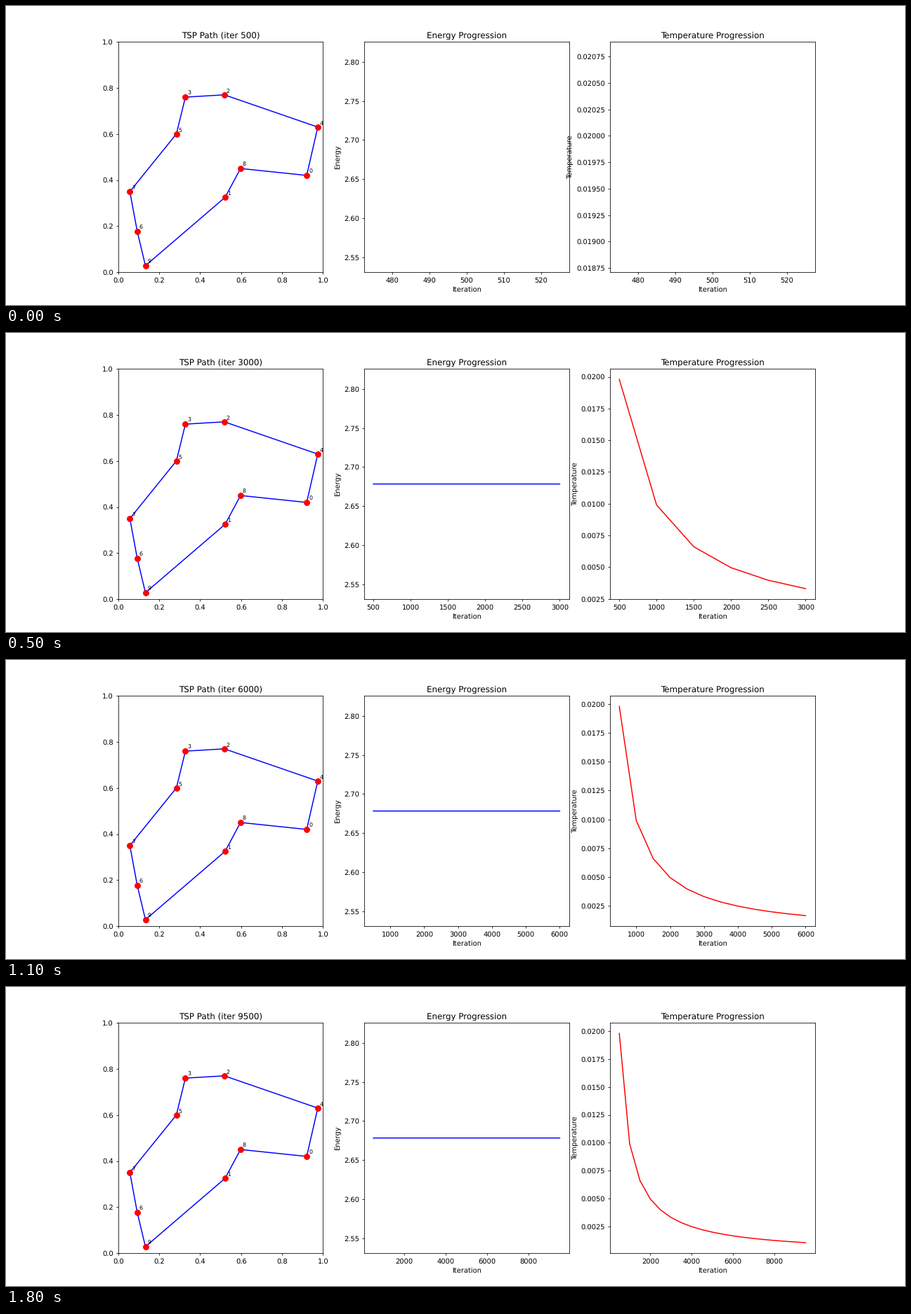
A matplotlib script that plays this animation: 1280 by 427 pixels, repeating every 1900 ms.

```python
import numpy as np
import matplotlib.pyplot as plt
from matplotlib.animation import FuncAnimation

W, H = 1280, 427
DPI = W / 18
FRAMES, INTERVAL = 19, 100
STEP = 500  # iterations per frame

plt.rcParams.update({"font.family": "DejaVu Sans", "text.hinting": "none"})

# Cities in visiting order, with their labels.
LABELS = "9180423576"
XS = [0.133, 0.522, 0.597, 0.920, 0.974, 0.518, 0.328, 0.284, 0.057, 0.093]
YS = [0.028, 0.325, 0.450, 0.420, 0.630, 0.770, 0.760, 0.600, 0.350, 0.177]

tour = np.array([XS + XS[:1], YS + YS[:1]])
energy = np.hypot(*np.diff(tour)).sum()

# The tiny extra height keeps the pixel count from rounding down.
fig, (path_ax, energy_ax, temp_ax) = plt.subplots(
    1, 3, figsize=(W / DPI, (H + 1e-6) / DPI), dpi=DPI)
fig.subplots_adjust(left=0.12478, right=0.89978)


def draw_path(ax):
    ax.plot(*tour, "b-")
    ax.scatter(XS, YS, c="red", s=64, linewidths=1, zorder=2.5)
    for label, x, y in zip(LABELS, XS, YS):
        ax.text(x + 0.01, y + 0.01, label, fontsize=8)
    ax.set_xlim(0, 1)
    ax.set_ylim(0, 1)


def setup_curve(ax, name, color):
    ax.set_title(f"{name} Progression")
    ax.set_xlabel("Iteration")
    ax.set_ylabel(name)
    return ax.plot([], [], color=color, snap=False)[0]


def set_curve(line, x, y):
    line.set_data(x, y)
    line.axes.relim()
    line.axes.autoscale_view()


draw_path(path_ax)
energy_line = setup_curve(energy_ax, "Energy", "blue")
temp_line = setup_curve(temp_ax, "Temperature", "red")


def update(frame):
    its = STEP * np.arange(1, frame + 2)
    path_ax.set_title(f"TSP Path (iter {its[-1]})")
    set_curve(energy_line, its, np.full(len(its), energy))
    set_curve(temp_line, its, 9.9 / its)
    return energy_line, temp_line


anim = FuncAnimation(fig, update, frames=FRAMES, interval=INTERVAL,
                     init_func=lambda: update(0), repeat=True, repeat_delay=0)
plt.show()
```
